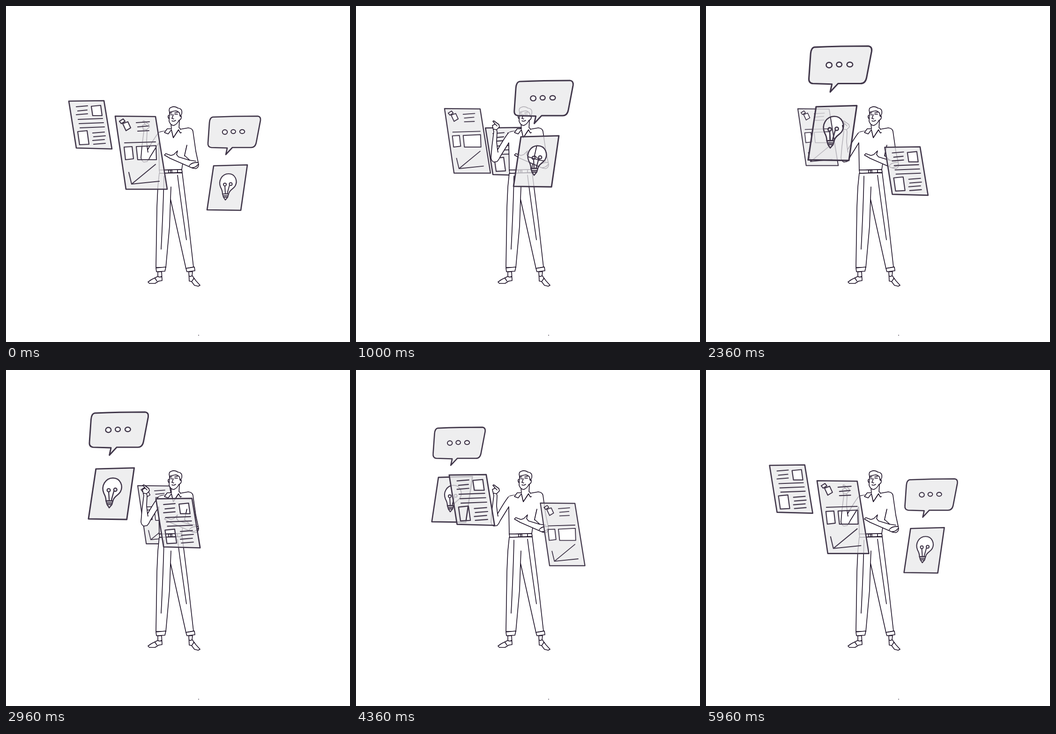
An HTML page with a canvas that plays this animation: 734x717 px, repeating every 6000 ms.

```html
<!DOCTYPE html>
<html lang="en">
<head>
<meta charset="utf-8">
<title>Floating cards</title>
<style>
html, body { margin: 0; width: 100%; height: 100%; overflow: hidden; background: #fff; }
canvas { display: block; width: 734px; height: 717px; }
</style>
</head>
<body>
<canvas id="stage" width="734" height="717"></canvas>
<script>
const ctx = document.getElementById('stage').getContext('2d');
const LOOP = 6000, LEG = 2000, STEP = 40;
const INK = '#1c1126', EDGE = '#41374a', PANE = 'rgba(232,232,234,.75)';

const ring = (x, y, rx, ry) =>
  `M${x - rx},${y}a${rx},${ry} 0 1 0 ${2 * rx},0a${rx},${ry} 0 1 0 ${-2 * rx},0Z`;
const rule = (x, y, len, rise = 2) => `M${x},${y}l${len},${-rise}`;

// Each card: outline, cut-out holes, inner strokes, and stops [x, y, scale] at right, front and left.
const card = (delay, stops, body, holes, lines) => ({
  delay, stops,
  pane: new Path2D(body + holes),
  body: new Path2D(body),
  holes: new Path2D(holes),
  lines: new Path2D(lines)
});

const chart = card(4000,
  [[474, 359, .826], [288, 313, 1], [187, 262.5, .768]],
  'M-55,-78L31,-77L56,78L-32,78Z',
  'M-39,-62L-28,-66L-22,-53L-32,-47Z M-46,-67L-38,-72L-34,-67L-42,-62Z' +
  'M-36,-12L-19,-13L-16,13L-33,15Z M-10,-13L32,-15L33,15L-7,15Z',
  rule(-10, -64, 28) + rule(-7, -55, 23) + rule(-7, -46, 24, 1) + rule(-35, -21, 66) +
  'M-26,42L-20,67L39,61 M-20,67L31,25');

const text = card(2000,
  [[464, 368, .99], [262, 283, 1.065], [180, 254, 1]],
  'M-46,-51L29,-52L46,51L-30,49Z',
  'M2,-40L22,-42L25,-20L5,-20Z M-27,14L-7,12L-3,41L-23,42Z',
  [-39, -30, -22].map((y, i) => rule(i == 1 ? -27 : -30, y, i == 1 ? 20 : 24)).join('') +
  [-12, -3, 6].map((y, i) => rule(-26 + i * 2, y, 52)).join('') +
  [17, 25, 33, 41].map((y, i) => rule(5 + i % 2 * 2, y, 25)).join(''));

const bubble = card(0,
  [[487, 269, 1], [314, 125, 1.24], [161.5, 131, .99]],
  'M-46,-32Q0,-34 50,-34Q57,-33 56,-25L47,22Q45,33 36,33L-4,33L-18,48L-15,34L-49,33' +
  'Q-57,32 -56,23L-53,-20Q-52,-31 -46,-32Z',
  ring(-20, 0, 5.2, 4.8) + ring(-2, -1, 4.8, 4.2) + ring(17, -1, 5.2, 4.2), '');

const idea = card(0,
  [[472, 388, 1], [297, 276, 1.25], [146.5, 252, 1.01]],
  'M-29,-47L43,-49L29,48L-43,47Z',
  'M-10,13Q-10,6 -14,-1C-20,-15 -11,-30 3,-30C17,-30 23,-15 17,-4C13,3 5,4 3,13Z',
  ring(-5, -7, 3, 3) + ring(7.5, -8, 3, 3) +
  'M-5,-4L-4,12 M5,-6L0,12 M-10,13L3,13L1,20L-4,26L-8,20Z M-9,17L2,17 M-8,20L1,20');

const cards = [bubble, idea, text, chart];

// Figure parts: d is filled white and stroked; s is stroked only.
const figure = [
  { d: 'M342,267Q330,267 325,271Q317,281 302,307L300,290L301,268L300,264L306,258L305,253L294,245' +
       'L292,246L297,252L291,255L294,268L290,300L288,324Q289,331 294,333L301,332Q305,328 308,321L326,292Z',
    s: 'M302,307L303,312 M295,250L301,256 M294,263L300,264' },
  { d: 'M327,357L324,386L322,430L320,558L341,558L349,470L351,412L384,560L400,557L389,460L376,356Z',
    s: 'M352,386L351,412 M337,363Q336,420 331,519 M366,361Q372,410 385,499' },
  { d: 'M324,567L324,577L310,584L303,589L306,592L318,592L326,587L333,586L332,567Z' +
       'M390,567L391,587L396,588L402,596L410,598L414,596L405,586L397,575L398,567Z',
    s: 'M324,577Q328,580 332,577 M391,576Q394,579 397,575 M318,581L322,587 M401,581L397,587' },
  { d: 'M320,559L341,557L339,566L321,567Z M384,560L402,557L403,565L386,567Z', s: '' },
  { d: 'M342,266L326,270L326,292L327,350L375,349L377,337L386,297L400,275Q398,262 389,260L371,263Z', bare: true,
    s: 'M326,292L327,350L375,349L377,336 M386,297L381,320' },
  { d: 'M327,350L375,349L376,355L328,357Z', s: 'M347,350L347,356L354,356L354,350Z M351,350V356 M366,350V355' },
  { d: 'M352,250L353,264L357,281L369,263L370,244Z', s: '' },
  { d: 'M353,262L344,262L338,270L346,273L353,264L357,281L368,264L372,271L377,269L370,260', s: '' },
  { d: 'M349,227L348,246Q351,254 357,255Q364,254 369,244Q375,242 374,235L371,234L372,224L356,218Z',
    s: 'M348,233Q344,234 347,240 M351,232L355,232 M360,231L366,231 M350,229L354,228 M360,228L366,227' +
       'M357,232L354,240L358,241 M354,245Q358,247 362,244' },
  { d: 'M349,227Q346,218 353,216Q360,213 367,218Q377,219 375,230L372,236L370,228Q365,223 360,224Q353,225 349,227Z', s: '' },
  { d: 'M372,263L389,260Q398,261 399,268L405,310L411,338Q411,345 405,347L398,346L366,332L350,325' +
       'L338,318L341,315L352,319L358,317L366,309L364,317L368,322L393,328L381,319L386,297Z', bare: true,
    s: 'M372,263L389,260Q398,261 399,268L405,310L411,338Q411,345 405,347L398,346L366,332L350,325' +
       'L338,318L341,315L352,319L358,317L366,309L364,317L368,322L391,329L405,331 M386,297L381,319L392,329' +
       'M391,341Q396,333 410,334 M397,345Q405,345 410,338' }
].map(p => ({ fill: new Path2D(p.d), line: new Path2D((p.bare ? '' : p.d) + p.s) }));

function stroke(path, color, width) {
  ctx.strokeStyle = color;
  ctx.lineWidth = width;
  ctx.stroke(path);
}

function drawFigure() {
  ctx.fillStyle = '#fff';
  for (const p of figure) {
    ctx.fill(p.fill);
    stroke(p.line, INK, 1.6);
  }
}

const phase = (c, t) => (t - c.delay + LOOP) % LOOP;
const inFront = (c, t) => phase(c, t) < 2 * LEG;

function drawCard(c, t) {
  const p = phase(c, t), i = Math.floor(p / LEG), k = p / LEG - i;
  const a = c.stops[i], b = c.stops[(i + 1) % 3];
  const [x, y, s] = a.map((v, n) => v + (b[n] - v) * k);
  ctx.save();
  ctx.translate(x, y);
  ctx.scale(s, s);
  ctx.fillStyle = PANE;
  ctx.fill(c.pane, 'evenodd');
  stroke(c.body, EDGE, 2.6);
  stroke(c.holes, EDGE, 2.2);
  stroke(c.lines, EDGE, 2.1);
  ctx.restore();
}

function frame(now) {
  const t = Math.floor(now / STEP) * STEP % LOOP;
  ctx.fillStyle = '#fff';
  ctx.fillRect(0, 0, 734, 717);
  ctx.lineJoin = ctx.lineCap = 'round';
  cards.filter(c => !inFront(c, t)).forEach(c => drawCard(c, t));
  drawFigure();
  cards.filter(c => inFront(c, t)).forEach(c => drawCard(c, t));
  ctx.fillStyle = INK;
  ctx.fillRect(410, 702, 2, 1);
  requestAnimationFrame(frame);
}
requestAnimationFrame(frame);
</script>
</body>
</html>
```
